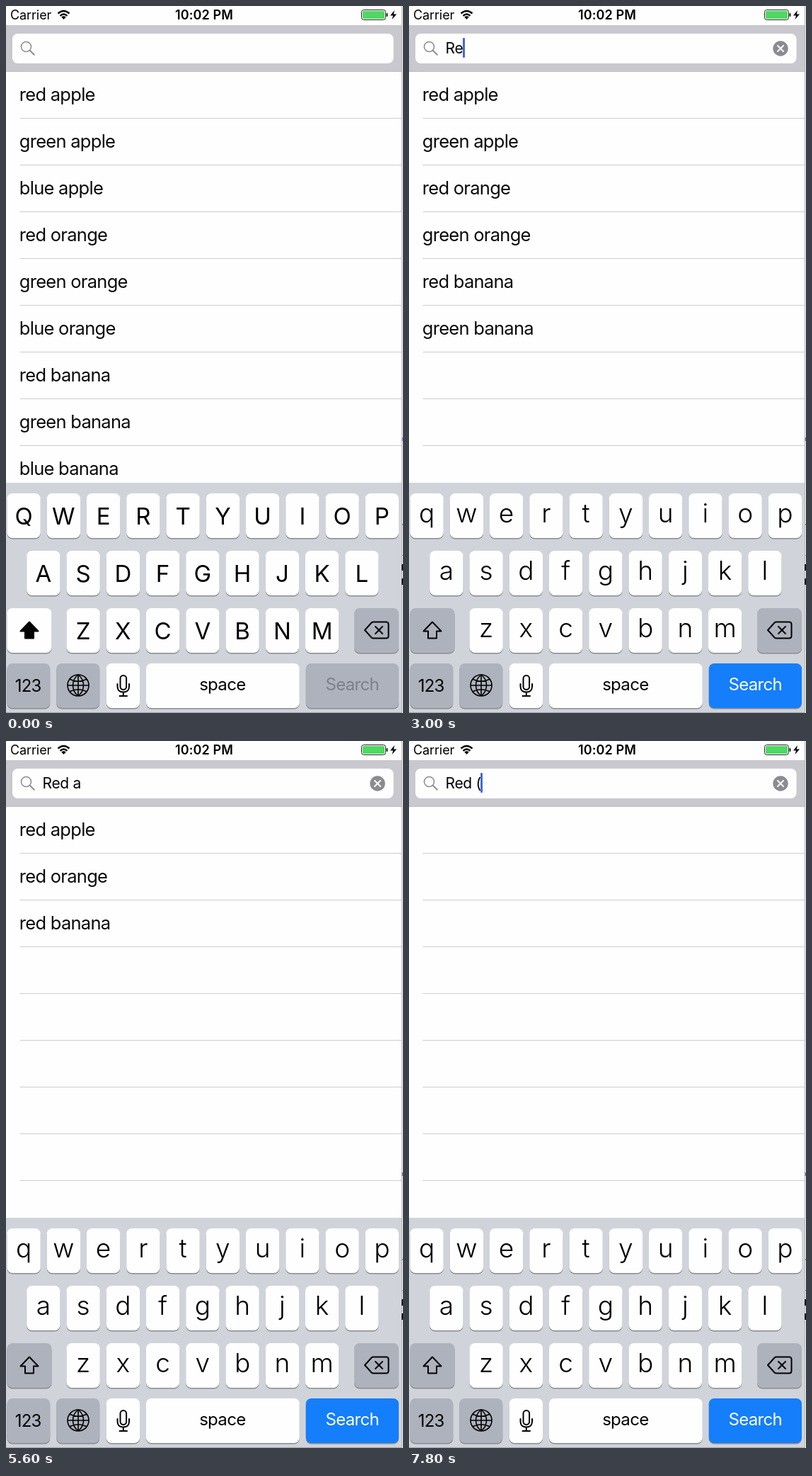
An HTML page that plays this animation: 561 px wide and 998 px high, repeating every 8 s.

```html
<!DOCTYPE html>
<html lang="en">
<head>
<meta charset="utf-8">
<title>Search list</title>
<style>
html, body { margin: 0; width: 100%; height: 100%; overflow: hidden; background: #fffeff; }
svg { display: block; width: 100vw; height: 100vh; }
text { font-family: Inter, Roboto, sans-serif; font-optical-sizing: none; fill: #000; white-space: pre; }
.status { font-size: 18px; }
.row { font-size: 25.5px; letter-spacing: -.72px; fill: #0a0a0a; }
.query { font-size: 21px; letter-spacing: -.3px; }
.label { font-size: 24px; letter-spacing: -.7px; text-anchor: middle; }
.upper { font-size: 33px; text-anchor: middle; }
.lower { font-size: 37px; font-weight: 300; text-anchor: middle; }
.line { fill: none; stroke: #000; stroke-width: 2; stroke-linejoin: round; stroke-linecap: round; }
</style>
</head>
<body>
<svg id="stage" viewBox="0 0 561 998"></svg>
<script>
const stage = document.getElementById('stage');
const LOOP = 8000, STEP = 200, ROW = 66;
const WHITE = '#fffeff', GREY = '#adb2bd', BLUE = '#147efb';

function add(tag, attrs, content) {
  const el = document.createElementNS('http://www.w3.org/2000/svg', tag);
  for (const k in attrs) el.setAttribute(k, attrs[k]);
  if (content) el.textContent = content;
  return stage.appendChild(el);
}
const rect = (x, y, width, height, fill, rx = 0) => add('rect', { x, y, width, height, fill, rx });
const text = (cls, x, y, content, extra) => add('text', { class: cls, x, y, ...extra }, content);
const path = (d, style = '') => add('path', { d, class: 'line', style });
const show = (el, on) => el.setAttribute('visibility', on ? 'visible' : 'hidden');

const items = ['apple', 'orange', 'banana']
  .flatMap(fruit => ['red', 'green', 'blue'].map(colour => colour + ' ' + fruit));

// time, query, caret x, start of the caret blink
const typed = [
  [0, '', 51, 100],
  [3000, 'Re', 76, 3000],
  [3200, 'Red', 89, 3200],
  [3400, 'Red ', 95, 3400],
  [3800, 'Red a', 106, 3800],
  [7200, 'Red ', 95, 7200],
  [7600, 'Red (', 101, 7600]
];

// Page and list
rect(0, 0, 561, 998, WHITE);
const rows = items.map((_, i) => text('row', 18.8, 134 + ROW * i));
for (let i = 0; i < 8; i++) rect(19.5, 158 + ROW * i, 540, 1, '#cccbd0');

// Status bar
text('status', 6, 19, 'Carrier', { 'letter-spacing': '-.1' });
path('M73.5 10.5Q81.5 3.5 89.5 10.5M76.5 13.8Q81.5 9.4 86.5 13.8', 'stroke-width:2.4;stroke-linecap:butt');
path('M78.3 15.5Q81.5 12.8 84.7 15.5L81.5 19Z', 'fill:#000;stroke:none');
text('status', 280, 19, '10:02 PM', { 'text-anchor': 'middle', 'font-weight': 600, 'letter-spacing': '.1' });
add('rect', { x: 502.5, y: 5.5, width: 34, height: 14, rx: 3, fill: WHITE, stroke: '#222' });
rect(504, 7, 31, 11, '#4fd863', 1.5);
rect(537.5, 10, 2, 5, '#222', 1);
path('M549 6L543 13.5H547L545.5 19L552 11.5H547.8Z', 'fill:#000;stroke:none');

// Search bar
rect(0, 27, 560, 66, '#c9c8ce');
rect(0, 92, 560, 1, '#bebdc3');
rect(9, 39, 538.5, 42, WHITE, 7.5);
add('circle', { cx: 28.5, cy: 57.5, r: 7, fill: 'none', stroke: '#8e8e93', 'stroke-width': 1.6 });
path('M33.8 62.8L39.8 68.8', 'stroke:#8e8e93');
const query = text('query', 51.5, 67);
const caret = rect(51, 45, 3, 28, '#426bd8', 1);
const clear = [
  add('circle', { cx: 525, cy: 60, r: 10.7, fill: '#8b8b90' }),
  path('M521 56L529 64M529 56L521 64', 'stroke:#fff')
];

// Keyboard
rect(0, 673, 560, 324.5, '#d0d4da');

function key(x, y, w, fill = WHITE) {
  rect(x, y + 1.5, w, 63, '#898b90', 7.5);
  return rect(x, y, w, 63, fill, 7.5);
}
const letters = [];
[['QWERTYUIOP', 1.5, 688], ['ASDFGHJKL', 29.25, 769], ['ZXCVBNM', 85.5, 850]].forEach(([chars, x0, y]) => {
  [...chars].forEach((ch, i) => {
    const x = x0 + 56.25 * i;
    key(x, y, 47.25);
    letters.push({ el: text('upper', x + 23.6, 0, ch), ch, y });
  });
});

const shiftKey = key(1.5, 850, 63);
const shiftIcon = path('M33 869.5L45.5 882.5H39V892.5H27V882.5H20.5Z');
key(492, 850, 63, GREY);
path('M507 881L516.5 870.5Q517.5 869.5 519 869.5H537Q540.5 869.5 540.5 873V889Q540.5 892.5 537 892.5H519Q517.5 892.5 516.5 891.5Z');
path('M522 876L532 886M532 876L522 886');

key(1.5, 928, 60.75, GREY);
text('label', 31.2, 968, '123', { 'letter-spacing': 0 });
key(71.25, 928, 61, GREY);
path('M87 959a15 15 0 1 0 30 0a15 15 0 1 0 -30 0M102 944V974M87 959H117'
  + 'M102 944C92 952 92 966 102 974C112 966 112 952 102 944'
  + 'M90.5 950.5Q102 956 113.5 950.5M90.5 967.5Q102 962 113.5 967.5', 'stroke-width:1.6');
key(141.75, 928, 47.25);
add('rect', { x: 161.5, y: 945, width: 8.6, height: 20, rx: 4.3, class: 'line' });
path('M157.5 957V960.5Q157.5 968.5 165.8 968.5Q174 968.5 174 960.5V957M165.8 969V974M160.5 974H171');
key(198, 928, 216.75);
text('label', 305.8, 966, 'space');
const searchKey = key(423.75, 928, 131.25, GREY);
const searchLabel = text('label', 489.3, 966, 'Search');

// Window edge
rect(0, 997, 561, 1, '#a0a2a6');
rect(559, 0, 1, 998, '#b0b0b3');
rect(560, 0, 1, 998, '#f0f0f1');
const edgeDot = rect(559, 609, 2, 5, '#8c90e0');
rect(560, 731, 1, 2, '#888');
rect(560, 775, 1, 1, '#888');
rect(559, 788, 2, 9, '#111');
rect(559, 808, 2, 9, '#111');

function blink(ms) {
  const u = ((ms % 1000) + 1000) % 1000 / 1000;
  if (u < .45) return 1;
  if (u < .55) return (.55 - u) / .1;
  return u < .92 ? 0 : (u - .92) / .08;
}

function draw(t) {
  const [, q, caretX, start] = typed.filter(s => s[0] <= t).pop();
  const active = q !== '';
  query.textContent = q;
  caret.setAttribute('x', caretX);
  caret.setAttribute('opacity', blink(t - start));
  clear.forEach(el => show(el, active));

  const words = q.toLowerCase().split(' ');
  const found = items.filter(item => words.every(w => item.includes(w)));
  rows.forEach((el, i) => { el.textContent = found[i] || ''; });

  letters.forEach(({ el, ch, y }) => {
    el.textContent = active ? ch.toLowerCase() : ch;
    el.setAttribute('class', active ? 'lower' : 'upper');
    el.setAttribute('y', y + (active ? 40.5 : 43.5));
  });
  shiftKey.setAttribute('fill', active ? GREY : WHITE);
  shiftIcon.style.fill = active ? 'none' : '#000';
  searchKey.setAttribute('fill', active ? BLUE : GREY);
  searchLabel.style.fill = active ? '#fff' : '#7c8089';
  edgeDot.setAttribute('fill', t < 2200 ? '#8c90e0' : '#85868f');
}

let last = -1;
function tick() {
  const t = Math.floor(performance.now() % LOOP / STEP) * STEP;
  if (t !== last) draw(last = t);
  requestAnimationFrame(tick);
}
tick();
</script>
</body>
</html>
```
